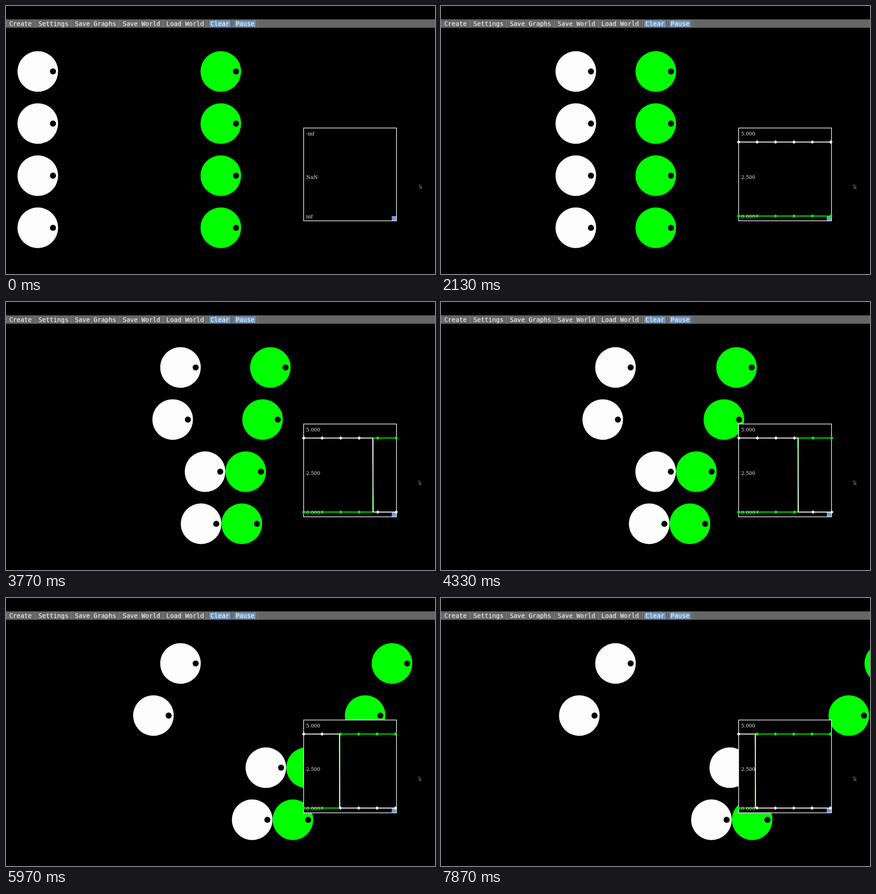
These frames come from a looping animation (947 px wide and 592 px high, 7940 ms). An HTML page with a canvas:

```html
<!DOCTYPE html>
<html lang="en">
<head>
<meta charset="utf-8">
<title>Collisions with different restitution</title>
<style>
html, body { margin: 0; width: 100%; height: 100%; overflow: hidden; background: #000; }
canvas { display: block; }
</style>
</head>
<body>
<canvas id="stage" width="947" height="592"></canvas>
<script>
const ctx = document.getElementById('stage').getContext('2d');
const LOOP = 7940, STEP = 100 / 3;
const WHITE = '#fdfdfd', GREEN = '#00ff00';

// Simulation progress: [ms, pixels a free ball has travelled]; paused at both ends
const CLOCK = [[0, 0], [289, 0], [1330, 127], [2130, 227], [3170, 351.8],
  [4330, 492.8], [5970, 693.3], [7012, 820.4], [LOOP, 820.4]];
const HIT = 315;

// Speeds after the hit, relative to the incoming speed
const ROWS = [
  { y: 144.6, white: 0, green: 1, gap: 0 },
  { y: 259.7, white: -.158, green: .843, gap: 0 },
  { y: 374.8, white: .5, green: .5, gap: .45 },
  { y: 489.9, white: .42, green: .42, gap: .45 },
];

const MENU = [['Create', 7], ['Settings', 71.5], ['Save Graphs', 152], ['Save World', 257.5],
  ['Load World', 354], ['Clear', 451.5], ['Pause', 507]];

const GRAPH = { x: 657, y: 269.5, size: 205, high: 300.5, low: 464 };
const RATE = .4865, MAX_SAMPLES = 299;

function travelled(ms) {
  const i = CLOCK.findIndex(key => key[0] > ms);
  const [t0, s0] = CLOCK[i - 1], [t1, s1] = CLOCK[i];
  return s0 + (s1 - s0) * (ms - t0) / (t1 - t0);
}

function rect(x, y, w, h, color) {
  ctx.fillStyle = color;
  ctx.fillRect(x, y, w, h);
}

function disc(x, y, r, color) {
  ctx.fillStyle = color;
  ctx.beginPath();
  ctx.arc(x, y, r, 0, 2 * Math.PI);
  ctx.fill();
}

function path(points) {
  ctx.beginPath();
  points.forEach(([x, y]) => ctx.lineTo(x, y));
}

function ball(x, y, color) {
  disc(x, y, 44.8, color);
  disc(x + 33.5, y, 6.7, '#000');
}

function drawMenu() {
  rect(0, 29.5, 947, 18.5, '#666');
  for (const x of [0, 64, 144, 250, 347, 444, 500, 555]) rect(x, 30, 1, 18, '#808080');
  rect(449, 32, 46.5, 14.5, '#6f96bd');
  rect(504.5, 32, 46.5, 14.5, '#6f96bd');
  ctx.fillStyle = '#fff';
  ctx.font = '13.8px "DejaVu Sans Mono", monospace';
  for (const [label, x] of MENU) ctx.fillText(label, x, 44);
}

function drawBalls(s) {
  const after = Math.max(0, s - HIT);
  for (const row of ROWS) {
    const gap = after ? row.gap : 0;
    ball(70.2 + Math.min(s, HIT) + row.white * after - gap, row.y, WHITE);
    ball(474.2 + row.green * after + gap, row.y, GREEN);
  }
}

function drawSeries(color, before, after, first, last) {
  const hit = Math.round(HIT * RATE), count = last - first;
  const px = i => GRAPH.x + .3 + (i - first) / count * GRAPH.size;
  const points = [[px(first), before]];
  if (last > hit) points.push([px(hit), before], [px(hit + 1), after]);
  points.push([px(last), last > hit ? after : before]);
  ctx.strokeStyle = ctx.fillStyle = color;
  ctx.lineWidth = 2;
  path(points);
  ctx.stroke();

  const stride = Math.max(1, Math.floor(count / 5));
  for (let i = first; i <= Math.min(last, first + 5 * stride); i += stride) {
    const x = px(i), y = i > hit ? after : before;
    path([[x - 4, y], [x, y - 4], [x + 4, y], [x, y + 4]]);
    ctx.fill();
  }
}

function drawGraph(s) {
  const { x, y, size, high, low } = GRAPH;
  const last = Math.round(s * RATE), first = Math.max(0, last - MAX_SAMPLES);
  rect(x, y, size, size, '#000');
  rect(851.5, 464, 10, 10, '#6f98da');
  ctx.strokeStyle = '#f4f4fa';
  ctx.lineWidth = 1.5;
  ctx.strokeRect(x, y, size, size);
  if (last) {
    drawSeries(GREEN, low, high, first, last);
    drawSeries(WHITE, high, low, first, last);
  }
  ctx.fillStyle = '#f0f0f0';
  ctx.font = '10.9px "DejaVu Serif", "DejaVu Sans", serif';
  const labels = last ? ['5.000', '2.500', '0.000'] : ['-inf', 'NaN', 'inf'];
  labels.forEach((label, i) => ctx.fillText(label, 662.5, [285.5, 382.3, 469][i]));
}

function drawCursor(x, y) {
  path([[0, 0], [0, 8], [2, 6.5], [3.5, 9.5], [4.8, 9], [3.4, 6.2], [5, 5.5]]
    .map(([dx, dy]) => [x + dx, y + dy]));
  ctx.closePath();
  ctx.fillStyle = '#000';
  ctx.fill();
  ctx.strokeStyle = '#aaa';
  ctx.lineWidth = .8;
  ctx.stroke();
}

function draw(now) {
  const tick = Math.min(236, Math.floor((now % LOOP + 5) / STEP));
  const s = travelled(tick * STEP);
  rect(0, 0, 947, 592, '#000');
  drawMenu();
  drawBalls(s);
  drawGraph(s);
  drawCursor(s ? 911.5 : 913, s ? 394.5 : 394);
}

const start = performance.now();
function loop() {
  draw(performance.now() - start);
  requestAnimationFrame(loop);
}
loop();
</script>
</body>
</html>
```
